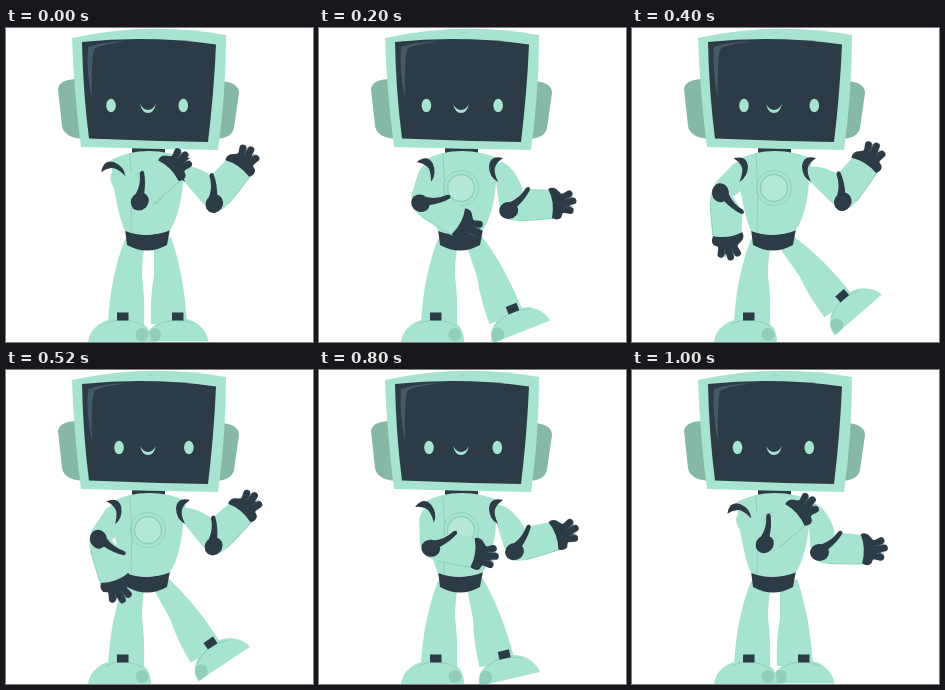
Recreate the animation shown at these times as an HTML page. Size 307x314 px, loop 1.04 s.

```html
<!DOCTYPE html>
<html lang="en">
<head>
<meta charset="utf-8">
<title>Dancing robot</title>
<style>
  @property --leg { syntax: "<angle>"; inherits: true; initial-value: 0deg; }
  @property --arm-l { syntax: "<angle>"; inherits: true; initial-value: 0deg; }
  @property --fore-l { syntax: "<angle>"; inherits: true; initial-value: 0deg; }
  @property --arm-r { syntax: "<angle>"; inherits: true; initial-value: 0deg; }
  @property --fore-r { syntax: "<angle>"; inherits: true; initial-value: 0deg; }
  @property --eye-l { syntax: "<length>"; inherits: true; initial-value: 0px; }
  @property --eye-r { syntax: "<length>"; inherits: true; initial-value: 0px; }

  html, body { margin: 0; width: 100%; height: 100%; overflow: hidden; background: #fff; }
  svg { display: block; width: 100vw; height: 100vh; animation: dance 1040ms infinite; }

  .skin { fill: #a6e3d0; }
  .dark { fill: #2d3b47; }
  .ear { fill: #86b8a8; }
  .shade { fill: #90cebb; }
  .line { fill: none; stroke: #8fd0bc; stroke-width: 1; }
  .finger { stroke: #2d3b47; stroke-width: 7; stroke-linecap: round; }
  .gap { fill: none; stroke: #53656e; stroke-width: .7; }

  .leg { transform: translate(158px, 217px) rotate(calc(var(--leg) * .85)) translate(-158px, -217px); }
  .foot { transform: translate(172px, 288px) rotate(calc(var(--leg) * .15)) translate(-172px, -288px); }
  .cap-l { transform: translate(109px, 142px) rotate(calc(var(--arm-l) * .8 - 44deg)); }
  .arm-l { transform: translate(116px, 144px) rotate(var(--arm-l)); }
  .arm-r { transform: translate(187.5px, 147px) rotate(var(--arm-r)); }
  .fore-l { transform: translate(0, 34.5px) rotate(var(--fore-l)); }
  .fore-r { transform: translate(0, 35.5px) rotate(var(--fore-r)); }
  .eye-l { transform: translateX(var(--eye-l)); }
  .eye-r { transform: translateX(var(--eye-r)); }

  /* each stretch advances in 40 ms steps */
  @keyframes dance {
    0%, 100% {
      --leg: 0deg; --arm-l: -31deg; --fore-l: -14deg; --arm-r: -36deg; --fore-r: -19deg;
      --eye-l: 0px; --eye-r: 0px; animation-timing-function: steps(3);
    }
    11.538% {
      --leg: -13deg; --arm-l: 6deg; --fore-l: -8deg; --arm-r: -10deg; --fore-r: -4deg;
      --eye-l: .8px; --eye-r: .7px; animation-timing-function: steps(4);
    }
    26.923% {
      --leg: -30deg; --arm-l: 44deg; --fore-l: 13deg; --arm-r: 3deg; --fore-r: -4deg;
      --eye-l: 4px; --eye-r: 3px; animation-timing-function: steps(3);
    }
    38.461% {
      --leg: -41deg; --arm-l: 53deg; --fore-l: 29deg; --arm-r: -41deg; --fore-r: -17deg;
      --eye-l: 7px; --eye-r: 5px; animation-timing-function: steps(1);
    }
    42.307% {
      --leg: -41deg; --arm-l: 55deg; --fore-l: 32deg; --arm-r: -42deg; --fore-r: -17deg;
      --eye-l: 7.6px; --eye-r: 5.5px; animation-timing-function: steps(5);
    }
    61.538% {
      --leg: -23deg; --arm-l: 25deg; --fore-l: 18deg; --arm-r: -23deg; --fore-r: -14deg;
      --eye-l: 8.7px; --eye-r: 5.7px; animation-timing-function: steps(4);
    }
    76.923% {
      --leg: -13deg; --arm-l: 7deg; --fore-l: 1deg; --arm-r: -13deg; --fore-r: -7deg;
      --eye-l: 5px; --eye-r: 1px; animation-timing-function: steps(5);
    }
    96.153% {
      --leg: 0deg; --arm-l: -29deg; --fore-l: -13deg; --arm-r: 0deg; --fore-r: -3deg;
      --eye-l: .5px; --eye-r: 0px; animation-timing-function: steps(1);
    }
  }
</style>
</head>
<body>
<svg viewBox="0 0 307 314" preserveAspectRatio="none">
  <defs>
    <!-- elbow at the origin, hand to the right -->
    <g id="forearm">
      <path class="skin" d="M-8 3Q-3 12 14 12L45 14L45 -15L21 -19L-3 -8Z"/>
      <path class="line" d="M8 11.5Q24 13 43 13.5"/>
      <path class="dark" d="M42 -16Q47 -2 42 13Q47 17 51 14L53 10Q62 8 62 0Q61 -9 54 -10L50 -15Q46 -18 42 -16Z"/>
      <path class="finger" d="M54 -5L62 -8.500M56 0L65 -1M54 6L61 8"/>
      <path class="gap" d="M57 -3.500L65 -5M57 4L64 4"/>
      <path class="dark" d="M2 -8Q13 -11 20 -20Q24 -22 24 -18Q18 -9 8 -2Z"/>
      <ellipse class="dark" rx="9.5" ry="8.5"/>
    </g>
  </defs>

  <g class="leg">
    <path class="skin" d="M148 216L165 209Q178 246 181 296H145Q144 270 148 248Z"/>
    <g class="foot">
      <path class="skin" d="M140 313.5Q141 302 149 297Q157 290 171 290Q185 290 193 297Q201 304 202.5 313.5Z"/>
      <path class="line" d="M149 298Q168 287 188 296"/>
      <path class="shade" d="M142 313.5Q141 300 149 300Q155 301 155 307Q154 313 149 313.5Z"/>
      <rect class="dark" x="166" y="284.5" width="11.5" height="8"/>
    </g>
  </g>

  <path class="skin" d="M119 211L139 216Q136 230 136 248Q139 270 138 296H102Q104 250 119 211Z"/>
  <path class="skin" d="M82 314Q83 304 92 297Q101 290 117 290Q133 290 141 299Q145 305 145 314Z"/>
  <path class="line" d="M99 296Q118 287 138 298"/>
  <circle class="shade" cx="136" cy="306.5" r="6.5"/>
  <rect class="dark" x="111" y="284.5" width="11.5" height="8"/>

  <path class="dark" d="M119 201Q141 212 164 201L161 217Q141 228 121 217Z"/>
  <path class="dark" d="M126 119H159V129H126Z"/>
  <path class="skin" d="M105 132Q122 123 143 123Q163 123 180 131L177 155Q174 188 163.5 202.5Q141 211 119 203Q113 190 108 160Z"/>
  <path class="line" d="M124 125Q127 165 125 204"/>
  <path class="line" stroke-dasharray="2 11" d="M120 142V198"/>
  <circle class="line" cx="142" cy="160" r="17.500"/>
  <circle cx="142" cy="160" r="13.500" fill="#b5e8d8" stroke="#8fd0bc" stroke-width="1.500"/>

  <path class="ear" d="M69 51Q53 52 52 61L56 98Q58 110 78 111Z"/>
  <path class="ear" d="M217 53Q233 55 233 65L228 100Q226 110 210 111Z"/>
  <path class="skin" d="M66 10Q143 -7 220 7Q220 64 212 122Q143 121 75 119Q68 65 66 10Z"/>
  <path class="dark" d="M76 14Q143 7 210 16.500Q208 64 202 114Q143 113 83 110.500Q77 64 76 14Z"/>
  <path d="M86 72Q80 42 82 19Q100 13 119 13.500Q92 17 88.500 21Q85 28 86 72Z" fill="#455965"/>
  <path class="line" d="M141 5H146"/>
  <ellipse class="skin eye-l" cx="105" cy="77.500" rx="4.800" ry="6.800"/>
  <ellipse class="skin eye-r" cx="177.300" cy="77.500" rx="4.800" ry="6.800"/>
  <path class="skin" d="M134 75.500Q136 85 142 85Q148 85 150 75.500Q147.500 82 142 82Q136.500 82 134 75.500Z"/>

  <g class="arm-r">
    <path class="skin" d="M-4 -14L-12 -8L-9 30Q2 42 14 30L15 14Q9 -6 -4 -14Z"/>
  </g>
  <path class="dark" d="M184 130Q171 127 170 138Q170 149 179 154Q174 143 176.500 138Q179 133 184 130Z"/>
  <g class="arm-r">
    <g class="fore-r"><use href="#forearm"/></g>
  </g>

  <g class="arm-l">
    <path class="skin" d="M-6 -6Q-15 -4 -15 8L-11 33Q0 43 10 32Q13 10 5 -2Q0 -8 -6 -6Z"/>
  </g>
  <g class="cap-l">
    <path class="dark" d="M-7 -12Q6 -15 7 -4Q7 7 -2 12Q3 1 .5 -4Q-2 -9 -7 -12Z"/>
  </g>
  <g class="arm-l">
    <g class="fore-l"><use href="#forearm"/></g>
  </g>
</svg>
</body>
</html>
```
